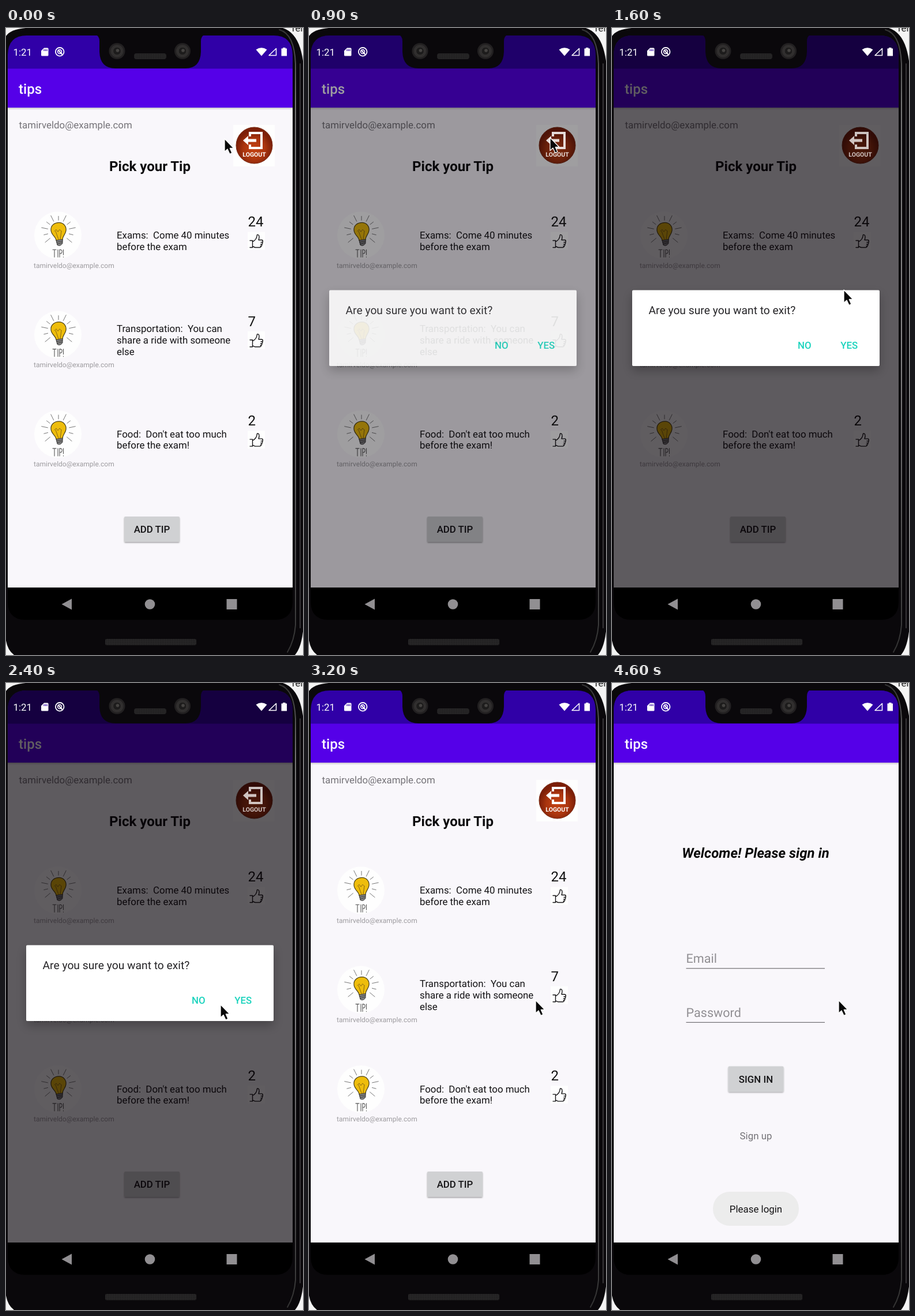
An HTML page for the animation above (4.7 s loop, 515 by 1087 pixels).

```html
<!DOCTYPE html>
<html lang="en">
<head>
<meta charset="utf-8">
<title>tips</title>
<style>
  html, body { margin: 0; width: 100%; height: 100%; overflow: hidden; background: #f4f4f4; }
  svg { display: block; width: 515px; height: 1087px; }
  text { font-family: Roboto, sans-serif; font-size: 16.87px; white-space: pre; text-rendering: geometricPrecision; }
  .line { fill: none; stroke-linecap: round; stroke-linejoin: round; }
</style>
</head>
<body>
<svg id="stage" viewBox="0 0 515 1087" xmlns="http://www.w3.org/2000/svg"></svg>
<script>
const LOOP = 4700, STEP = 100;
const USER = 'tamirveldo@example.com';
const PAPER = '#f9f7fb', INK = '#151416', TEAL = '#1bd3bd';

// [time, value...] rows; values are interpolated between rows
const cursorTrack = [
  [0, 379, 192], [100, 386, 195], [200, 402, 201], [300, 430, 208], [400, 443, 210],
  [500, 430, 200], [600, 418, 190], [1200, 418, 190], [1300, 417, 208], [1400, 414, 290],
  [1500, 408, 385], [1600, 402, 454], [1700, 392, 560], [1800, 383, 604], [1900, 376, 598],
  [2100, 370, 575], [2300, 372, 558], [2500, 372, 557], [2600, 379, 555], [2700, 388, 552], [2800, 393, 550]
];
const dimTrack = [[700, 0], [800, .14], [900, .38], [1000, .56], [1100, .63], [2800, .63], [2900, .55], [3000, .38], [3100, .14], [3200, 0]];
const dialogTrack = [[700, 0], [800, .32], [900, .87], [1000, 1], [2800, 1], [2900, .8], [3000, .3], [3100, 0]];
const openTrack = [[3200, 0], [3300, .66], [3400, .933], [3500, .985], [3600, 1]];
const toastTrack = [[3300, 0], [3400, .5], [3500, .85], [3600, 1]];

function sample(track, t) {
  const next = track.findIndex(row => row[0] > t);
  if (next === 0) return track[0].slice(1);
  if (next < 0) return track[track.length - 1].slice(1);
  const a = track[next - 1], b = track[next], k = (t - a[0]) / (b[0] - a[0]);
  return a.slice(1).map((v, i) => v + (b[i + 1] - v) * k);
}

const text = (x, y, s, attrs = '') => `<text x="${x}" y="${y}" ${attrs}>${s}</text>`;
const rect = (x, y, w, h, fill, attrs = '') =>
  `<rect x="${x}" y="${y}" width="${w}" height="${h}" fill="${fill}" ${attrs}/>`;
const circle = (x, y, r, fill, attrs = '') => `<circle cx="${x}" cy="${y}" r="${r}" fill="${fill}" ${attrs}/>`;
const line = (d, color, width, attrs = '') =>
  `<path class="line" d="${d}" stroke="${color}" stroke-width="${width}" ${attrs}/>`;
const button = (x, y, label) =>
  rect(x, y, 96, 44, '#d0d1d3', 'rx="2" filter="url(#lift)"') +
  text(x + 48, y + 28, label, `text-anchor="middle" font-weight="500" fill="${INK}"`);

const appWindow = content =>
  rect(0, 0, 515, 72, '#3000a7') + rect(3, 138, 494, 833, PAPER) +
  rect(3, 138, 494, 4, 'url(#barShade)') + rect(3, 70.5, 494, 67.5, '#5500e8') +
  rect(3, 970, 494, 70, '#000') +
  text(22, 113.5, 'tips', 'style="font-size:24px" font-weight="500" fill="#fff"') + content;

function rays() {
  let d = '';
  for (let i = 0; i < 11; i++) {
    const a = (140 + i * 26) * Math.PI / 180, far = i % 2 ? 26 : 30;
    const p = r => `${(1 + r * Math.cos(a)).toFixed(1)} ${(-7 + r * Math.sin(a)).toFixed(1)}`;
    d += `M${p(19)}L${p(far)}`;
  }
  return line(d, '#666', .9);
}

const bulb = circle(0, 0, 41, '#fefefe') + rays() +
  `<path d="M-3 9C-4 2-11 0-12-8C-13-17-6-22 2-22C10-22 15-15 14-8C13-1 8 1 8 8Z" fill="#eebd0c" stroke="#4b4018" stroke-width="1.2"/>
   <path d="M-3 9L8 7L8 14Q4 20-1 17Z" fill="#888" stroke="#333"/>` +
  line('M-6-7L-3-10L0-6L3-10L6-7M-4-7L1 7M6-7L4 7', '#8a6813', 1) +
  line('M-2 12L8 10M-1 15L7 13', '#333', 1) +
  line('M-9 25H-3M-6 25V38M0 25V38M3 38V25Q8 25 7 29Q7 32 3 32M9.500 25V34M9.500 37.500V38', '#555', 1.1);

const thumb = rect(-15, -16, 30, 31, '#fefefe') +
  line('M-11-1H-6.500V11H-11M-6.500 1C-2-1 1-5 1.500-11C5-12 6-7 4-2H10Q12-1 11 2Q11 4 10 5Q10 7 9 8Q8 11 6 11H-2L-6.500 9M10 2H8M9.500 5.500H7.500M8.500 8.500H7', INK, 1.4);

function tip(index, count, lines) {
  const dy = index * 172.3, mid = 369 + dy;
  return `<g transform="translate(90 ${359.3 + dy})">${bulb}</g>` +
    text(48, 415.5 + dy, USER, 'style="font-size:12px" fill="#9d9b9f"') +
    lines.map((s, i) => text(192, mid + 5.8 + (i - (lines.length - 1) / 2) * 19.7, s, `fill="${INK}"`)).join('') +
    text(419.5, 344.3 + dy, count, 'style="font-size:24px" fill="#111"') +
    `<g transform="translate(434 ${369.5 + dy})">${thumb}</g>`;
}

const logoutDisc = circle(430.5, 203.5, 31.5, 'url(#red)', 'stroke="#7a2c16" stroke-width="1"');
const logoutGlyph = line('M423 188V182H443V208H423V202', '#fff', 4, 'style="stroke-linecap:butt;stroke-linejoin:miter"') +
  '<path d="M411 195L420 187V192.500H434V197.500H420V203Z" fill="#fff"/>' +
  text(430.5, 222.5, 'LOGOUT', 'style="font-size:10.5px" font-weight="700" text-anchor="middle" fill="#fff"');

const home = appWindow(
  text(22.5, 173.7, USER, 'fill="#757378"') +
  rect(394, 168, 72, 72, '#fefefe') + logoutDisc +
  text(249.5, 248, 'Pick your Tip', 'style="font-size:24px" font-weight="700" text-anchor="middle" fill="#0c0b0d"') +
  tip(0, '24', ['Exams:  Come 40 minutes', 'before the exam']) +
  tip(1, '7', ['Transportation:  You can', 'share a ride with someone', 'else']) +
  tip(2, '2', ["Food:  Don't eat too much", 'before the exam!']) +
  button(205, 847, 'ADD TIP'));

const field = (y, label) => text(128.5, y - 9, label, 'style="font-size:21.6px" fill="#918f93"') +
  rect(128.5, y, 240.5, 1.2, '#706e72');

const login = appWindow(
  text(249, 303, 'Welcome! Please sign in', 'style="font-size:24px" font-weight="700" font-style="italic" text-anchor="middle" fill="#080808"') +
  field(494.2, 'Email') + field(587.8, 'Password') +
  button(201.5, 664.5, 'SIGN IN') +
  text(249.5, 791, 'Sign up', 'text-anchor="middle" fill="#757378"'));

const dialog = rect(35, 454.5, 429, 131.5, '#fff', 'rx="2" filter="url(#float)"') +
  text(63.5, 496.3, 'Are you sure you want to exit?', 'style="font-size:19.28px" fill="#252427"') +
  text(322, 555.5, 'NO', `font-weight="500" fill="${TEAL}"`) +
  text(396.3, 555.5, 'YES', `font-weight="500" fill="${TEAL}"`);

const toast = rect(175, 882, 149, 59, '#ececec', 'rx="29"') +
  text(249.5, 918, 'Please login', `text-anchor="middle" fill="${INK}"`);

const statusIcons = text(12.5, 47.5, '1:21', 'fill="#fff"') +
  '<path d="M66 34.500H72Q73.500 34.500 73.500 36V47Q73.500 48.500 72 48.500H62.500Q61 48.500 61 47V39.500Z" fill="#fff"/>' +
  line('M66 37V39.500M68.500 37V39.500M71 37V39.500', '#3000a7', 1.2) +
  circle(93.2, 41.3, 7.3, 'none', 'stroke="#fff" stroke-width="1.8"') +
  circle(93, 41, 3.4, 'none', 'stroke="#fff" stroke-width="1.6"') +
  line('M92 40L98 46.500', '#fff', 2) +
  '<path d="M433.500 37.500Q443 31 452.500 37.500L443 48.500Z" fill="#fff"/>' +
  line('M468.500 35.500V47.500H456Z', '#fff', 1.5) +
  '<path d="M480 34H484.500V35.500H487V48.500H477.500V35.500H480Z" fill="#fff"/>';

const navIcons = '<path d="M96.500 999L114 989.500V1008.500Z" fill="#918f92"/>' +
  circle(249.5, 999, 8.8, '#918f92') + rect(382.5, 990, 18, 18, '#918f92');

const lens = x => circle(x, 40, 14, '#222021') + circle(x, 40, 11, '#302e2e') +
  circle(x, 40, 7, '#1d1c1c', 'stroke="#393736" stroke-width="1"') + circle(x + 1, 39, 2.8, '#454341');

const notch = '<path d="M154 11Q162 13 162 23V41Q163 70 190 70H311Q337 70 338 41V23Q338 13 346 11Z" fill="#0a080b"/>' +
  lens(192.5) + lens(306) + rect(222, 44, 56, 10, 'url(#mesh)', 'rx="4"');

const phone = text(496, 6, 'rer', 'fill="#222"') +
  '<path d="M0 14Q8 2 34 0H480Q511 10 516 66V1034Q514 1072 501 1087H14Q3 1079 0 1062Z" fill="#0a080b"/>' +
  line('M474 3Q500 10 502 62V1035Q500 1062 488 1082', 'url(#rim)', 2) +
  line('M510 62V1040', '#444345', 1.6) +
  rect(172, 1059, 158, 11, 'url(#mesh)', 'rx="3"');

document.getElementById('stage').innerHTML = `
<defs>
  <clipPath id="screen"><path d="M3 46Q4 13 36 13H464Q496 13 497 46V996Q496 1026 466 1026H34Q4 1026 3 996Z"/></clipPath>
  <linearGradient id="barShade" x2="0" y2="1"><stop stop-color="#aaa5b0" stop-opacity=".65"/><stop offset="1" stop-color="#aaa5b0" stop-opacity="0"/></linearGradient>
  <linearGradient id="rim" gradientUnits="userSpaceOnUse" x1="0" y1="0" x2="0" y2="1080">
    <stop stop-color="#333"/><stop offset=".12" stop-color="#777"/><stop offset=".5" stop-color="#8b898b"/><stop offset="1" stop-color="#333"/></linearGradient>
  <radialGradient id="red" cy=".6"><stop stop-color="#c54414"/><stop offset=".6" stop-color="#aa350e"/><stop offset="1" stop-color="#7c1f08"/></radialGradient>
  <pattern id="mesh" width="3" height="3" patternUnits="userSpaceOnUse">${rect(0, 0, 3, 3, '#282728')}${rect(0, 0, 1.4, 1.4, '#161516')}</pattern>
  <filter id="lift" x="-10%" y="-20%" width="120%" height="150%"><feDropShadow dx="0" dy="1.5" stdDeviation="1.2" flood-opacity=".35"/></filter>
  <filter id="float" x="-15%" y="-30%" width="130%" height="180%"><feDropShadow dx="0" dy="8" stdDeviation="9" flood-opacity=".25"/></filter>
</defs>
${phone}
<g clip-path="url(#screen)">
  <g id="home">${home}${rect(0, 0, 515, 970, '#050006', 'id="dim"')}<g id="glyph">${logoutGlyph}</g></g>
  <g id="login">${login}</g>
  <g id="dialog">${dialog}</g>
  <g id="toast">${toast}</g>
  ${statusIcons}${navIcons}
</g>
${notch}
<path id="cursor" d="M0 0V22.500L5 18L9 26.500L13 24.700L9.300 16.500H16Z" fill="#080808" stroke="#fff" stroke-width="1.3" stroke-linejoin="round"/>`;

const el = Object.fromEntries(['home', 'dim', 'glyph', 'login', 'dialog', 'toast', 'cursor']
  .map(id => [id, document.getElementById(id)]));
const zoom = (node, s) => node.setAttribute('transform', `translate(249.5 540) scale(${s}) translate(-249.5 -540)`);
const fade = (node, a) => node.setAttribute('opacity', a);

function draw(now) {
  const t = Math.floor(now % LOOP / STEP) * STEP;
  const [x, y] = sample(cursorTrack, t), [dim] = sample(dimTrack, t), [open] = sample(openTrack, t);
  el.cursor.setAttribute('transform', `translate(${x} ${y})`);
  fade(el.dim, dim);
  fade(el.glyph, 1 - dim * .4);
  fade(el.dialog, sample(dialogTrack, t)[0]);
  fade(el.toast, sample(toastTrack, t)[0]);
  fade(el.login, open > 0 ? 1 : 0);
  zoom(el.home, 1 + .045 * open);
  zoom(el.login, .85 + .15 * open);
}

const start = performance.now();
function tick() {
  draw(performance.now() - start);
  requestAnimationFrame(tick);
}
tick();
</script>
</body>
</html>
```
